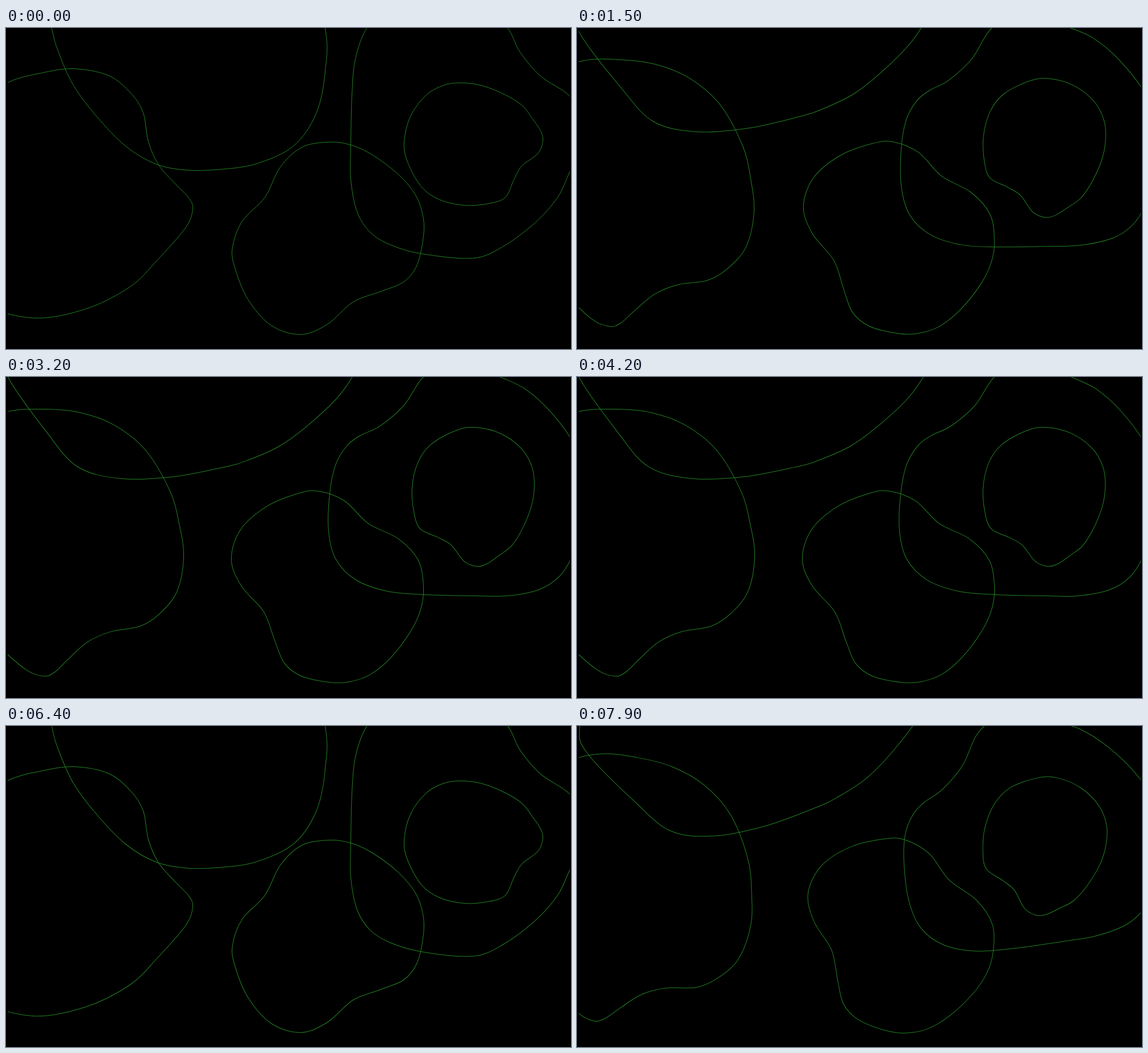
Recreate the animation shown at these times as an HTML page with a canvas. Size 994x564 px, loop 8000 ms.

```html
<!DOCTYPE html>
<html lang="en">
<head>
<meta charset="utf-8">
<title>Turning outlines</title>
<style>
  html, body { margin: 0; height: 100%; overflow: hidden; background: #000; }
  canvas { display: block; }
</style>
</head>
<body>
<canvas id="stage" width="994" height="564"></canvas>
<script>
const ctx = document.getElementById('stage').getContext('2d');
const LOOP = 8000;

// Each outline: pivot, turning direction, and points at rest.
const blobs = [
  { x: 93, y: 290, dir: 1, points: [
    [3, 95], [60, 79], [118, 71], [180, 83], [220, 115], [241, 149], [250, 199], [268, 240],
    [298, 274], [321, 298], [328, 318], [315, 351], [265, 408], [218, 454], [140, 493],
    [47, 509], [-50, 483], [-112, 435], [-137, 380], [-141, 316], [-135, 253], [-113, 193], [-69, 138]] },
  { x: 566, y: 368, dir: 1, points: [
    [568, 200], [606, 205], [645, 223], [690, 257], [720, 293], [733, 330], [734, 365],
    [723, 415], [700, 445], [660, 462], [610, 481], [565, 520], [518, 538], [466, 522],
    [425, 476], [402, 420], [398, 385], [415, 339], [455, 297], [482, 244], [520, 209]] },
  { x: 818.5, y: 206.5, dir: 1, points: [
    [802, 96], [838, 101], [878, 117], [908, 136], [925, 158], [940, 180], [944, 198],
    [935, 220], [907, 242], [893, 266], [878, 297], [848, 308], [806, 311], [762, 301],
    [730, 278], [706, 235], [700, 200], [711, 155], [738, 118], [770, 100]] },
  { x: 310, y: -72, dir: -1, points: [
    [80, 0], [92, 42], [118, 100], [160, 156], [210, 207], [262, 238], [315, 249], [375, 248],
    [440, 238], [505, 207], [545, 150], [561, 75], [559, -10], [505, -200], [440, -290],
    [360, -350], [285, -386], [238, -379], [143, -312], [81, -257], [60, -182], [63, -90]] },
  { x: 802.5, y: 187.5, dir: -1, points: [
    [634, 0], [614, 55], [608, 120], [606, 210], [606, 265], [617, 322], [640, 358],
    [675, 380], [730, 396], [820, 404], [873, 384], [930, 342], [970, 297], [992, 251],
    [1014, 210], [1015, 160], [990, 118], [940, 84], [904, 42], [887, 7], [868, -17],
    [835, -36], [785, -46], [720, -48], [670, -35]] }
];

// Turns: start time in ms and change of angle in degrees.
const turns = [[717, 89.5], [2800, 0.4], [4455, -89.9], [7300, 89.9]];

// Closed Catmull-Rom curve, relative to the pivot.
function outline({ x, y, points }) {
  const path = new Path2D(), n = points.length;
  const at = i => points[(i + n) % n];
  path.moveTo(points[0][0] - x, points[0][1] - y);
  for (let i = 0; i < n; i++) {
    const [a, b, c, d] = [at(i - 1), at(i), at(i + 1), at(i + 2)];
    path.bezierCurveTo(
      b[0] + (c[0] - a[0]) / 6 - x, b[1] + (c[1] - a[1]) / 6 - y,
      c[0] - (d[0] - b[0]) / 6 - x, c[1] - (d[1] - b[1]) / 6 - y,
      c[0] - x, c[1] - y);
  }
  path.closePath();
  return path;
}

// Damped spring from 0 to 1 with a small overshoot.
function spring(ms) {
  if (ms <= 0) return 0;
  const w = 6 * ms / 1000, damp = 0.675;
  return 1 - Math.exp(-damp * w) * (Math.cos(w) + damp * Math.sin(w));
}

for (const blob of blobs) blob.path = outline(blob);

function draw(now) {
  const t = now % LOOP;
  const angle = turns.reduce((sum, [start, by]) => sum + by * spring(t - start), 0) * Math.PI / 180;
  ctx.fillStyle = '#000';
  ctx.fillRect(0, 0, 994, 564);
  ctx.save();
  ctx.beginPath();
  ctx.rect(3, 0, 989, 564);
  ctx.clip();
  ctx.strokeStyle = '#238023';
  ctx.lineWidth = 1;
  for (const { x, y, dir, path } of blobs) {
    ctx.save();
    ctx.translate(x + 0.5, y + 0.5);
    ctx.rotate(dir * angle);
    ctx.stroke(path);
    ctx.restore();
  }
  ctx.restore();
}

const begin = performance.now();
function tick() {
  draw(performance.now() - begin);
  requestAnimationFrame(tick);
}
tick();
</script>
</body>
</html>
```
